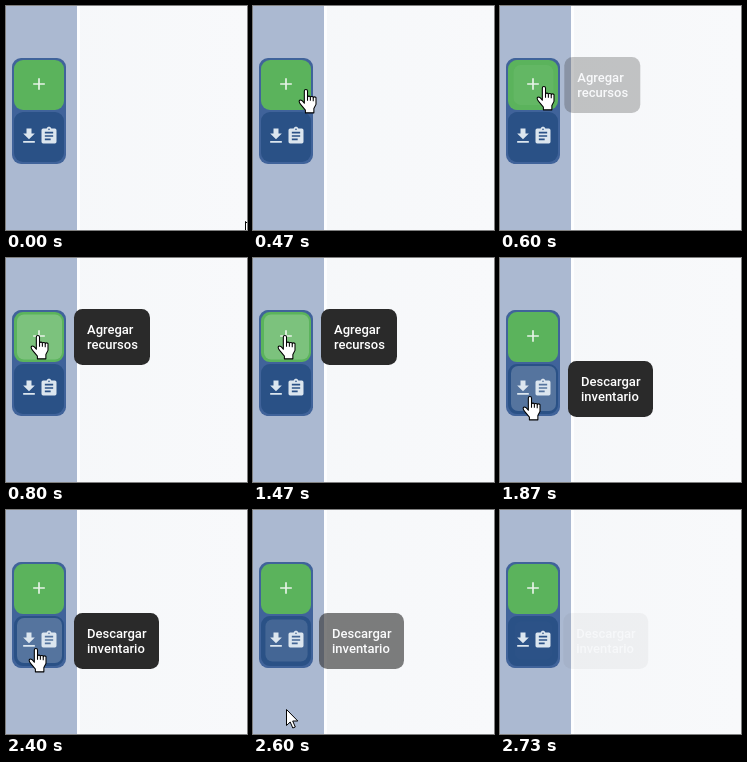
Write an HTML page that moves like this. It is 241x224 px and loops after 3400 ms.

```html
<!DOCTYPE html>
<html lang="es">
<head>
<meta charset="utf-8">
<style>
html, body { margin: 0; width: 100%; height: 100%; overflow: hidden; }
svg { display: block; width: 241px; height: 224px; }
text { font: 500 13px Roboto, Arial, sans-serif; fill: #fff; }
</style>
</head>
<body>
<svg viewBox="0 0 241 224">
  <defs>
    <linearGradient id="page"><stop stop-color="#f5f7f9"/><stop offset="1" stop-color="#f8f9fb"/></linearGradient>
  </defs>
  <rect width="241" height="224" fill="url(#page)"/>
  <rect width="71" height="224" fill="#abb9d1"/>
  <rect x="71" width="3" height="224" fill="#fdfeff"/>

  <rect x="6" y="52" width="54" height="106" rx="9" fill="#40639a"/>
  <rect x="8" y="54" width="50" height="50" rx="9" fill="#5bb35c"/>
  <rect x="8" y="106" width="50" height="50" rx="9" fill="#2a5186"/>
  <rect id="glowAdd" fill="#fff"/>
  <rect id="glowGet" fill="#fff"/>
  <g fill="#dce6ef">
    <path transform="translate(23 68) scale(.8333)" fill="#e8f4e8" d="M19 13H13V19H11V13H5V11H11V5H13V11H19Z"/>
    <path transform="translate(13 120) scale(.8333)" d="M5 20H19V18H5M19 9H15V3H9V9H5L12 16Z"/>
    <path transform="translate(33 120) scale(.8333)" fill-rule="evenodd" d="M17 9H7V7H17ZM17 13H7V11H17ZM14 17H7V15H14ZM12 3A1 1 0 0 1 12 5A1 1 0 0 1 12 3ZM19 3H14.8C14.4 1.8 13.3 1 12 1S9.6 1.8 9.2 3H5A2 2 0 0 0 3 5V19A2 2 0 0 0 5 21H19A2 2 0 0 0 21 19V5A2 2 0 0 0 19 3Z"/>
  </g>

  <g id="tipAdd">
    <rect x="68" y="51" width="76" height="56" rx="8.5" fill="#2a2a2a"/>
    <text x="81" y="76">Agregar</text><text x="81" y="91">recursos</text>
  </g>
  <g id="tipGet">
    <rect x="68" y="103" width="85" height="56" rx="8.5" fill="#2a2a2a"/>
    <text x="81" y="128">Descargar</text><text x="81" y="143">inventario</text>
  </g>

  <g id="pointer" fill="#fff" stroke="#000" stroke-linejoin="round">
    <path id="arrow" d="M.5 .5V16.5L4.2 13L6.8 19L9.3 18L6.7 12H11.8Z"/>
    <g id="hand" transform="translate(-5.5 0) scale(1.06)">
      <path d="M5.5 13.5V2A1.5 1.5 0 0 1 8.5 2V7.5A1.4 1.2 0 0 1 11.2 7.8A1.4 1.2 0 0 1 13.9 8.3A1.3 1.2 0 0 1 16.5 9.1V14.5L14.5 18.5V22.5H6.5V20L2 14.5Q-.5 11 1.5 10.5Q3 10 5.5 13.5Z"/>
      <path fill="none" d="M8.5 7.5V11M11.2 7.8V11M13.9 8.5V11.5"/>
    </g>
  </g>
</svg>
<script>
const LOOP = 3400, LAST_MOVE = 2734, STEP = 200 / 3, FADE = 300;
const el = id => document.getElementById(id);
const mix = (a, b, p) => a + (b - a) * p;

// Pointer stops: time, x, y.
const stops = [
  [0, 239, 215], [470, 50, 82], [800, 30, 77], [1470, 30, 77],
  [1670, 32, 118], [1870, 28, 138], [2400, 28, 138], [2700, 36, 230]
];

function pointerAt(t) {
  const i = Math.max(1, stops.findIndex(s => s[0] > t));
  const a = stops[t < 2700 ? i - 1 : stops.length - 2];
  const b = stops[t < 2700 ? i : stops.length - 1];
  const p = Math.min(1, (t - a[0]) / (b[0] - a[0]));
  return [mix(a[1], b[1], p), mix(a[2], b[2], p)].map(Math.round);
}

function smooth(t, start) {
  const p = Math.min(1, Math.max(0, (t - start) / FADE));
  return p * p * (3 - 2 * p);
}

const visible = (t, show, hide) => smooth(t, show) - smooth(t, hide);

function drawButton(name, cy, a) {
  const tip = el('tip' + name), glow = el('glow' + name);
  tip.setAttribute('opacity', a);
  tip.setAttribute('transform', `translate(${-5 * (1 - a)} 0)`);
  const size = mix(38, 45, a);
  const box = { x: 33.5 - size / 2, y: cy - size / 2, width: size, height: size, rx: 7, opacity: .2 * a };
  for (const key in box) glow.setAttribute(key, box[key]);
}

function draw(time) {
  // The picture advances fifteen times a second and rests after the last move.
  const t = Math.floor((Math.min(time % LOOP, LAST_MOVE) + 4) / STEP) * STEP;
  drawButton('Add', 79, visible(t, 500, 1530));
  drawButton('Get', 130.5, visible(t, 1566, 2470));

  const [x, y] = pointerAt(t);
  const over = x <= 60 && y >= 52 && y <= 158;
  el('pointer').setAttribute('transform', `translate(${x} ${y})`);
  el('hand').setAttribute('visibility', over ? 'visible' : 'hidden');
  el('arrow').setAttribute('visibility', over ? 'hidden' : 'visible');
}

const start = performance.now();
function tick() {
  draw(performance.now() - start);
  requestAnimationFrame(tick);
}
tick();
</script>
</body>
</html>
```
